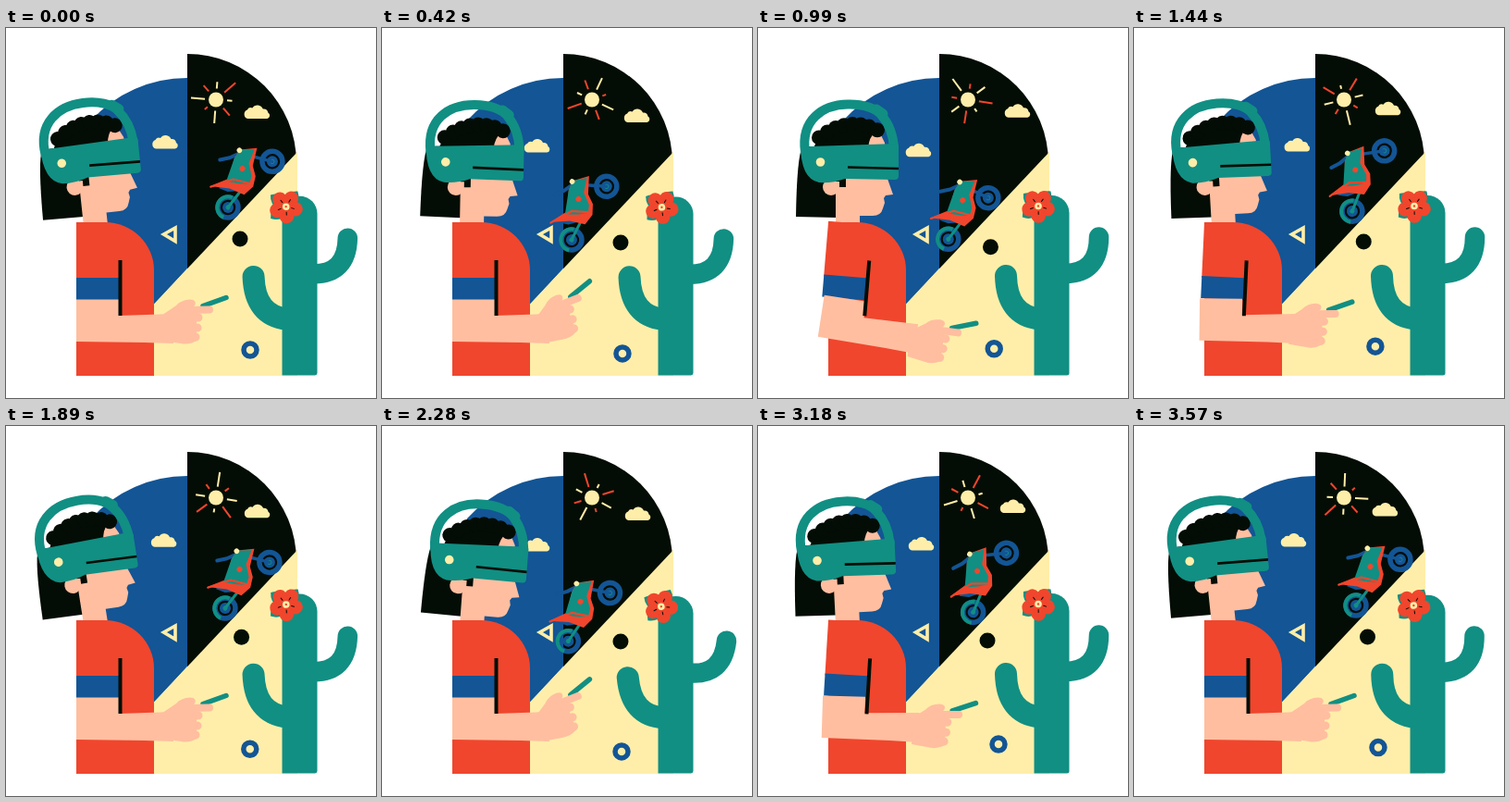
Animation of 400x400 px, one loop 3.6 s. Source, as an HTML page:

```html
<!DOCTYPE html>
<html lang="en">
<head>
<meta charset="utf-8">
<title>Virtual desert ride</title>
<style>
  html, body { margin: 0; width: 100%; height: 100%; overflow: hidden; background: #fff; }
  svg { display: block; width: 100vw; height: 100vh; }
  .black { fill: #040d05; } .blue { fill: #135595; } .cream { fill: #ffeea9; }
  .red { fill: #f0462d; } .teal { fill: #118f83; } .skin { fill: #ffbea0; }
  .line { fill: none; stroke-linecap: round; stroke-linejoin: round; }
  .flat { stroke-linecap: butt; stroke-linejoin: miter; }
  .s-teal { stroke: #118f83; } .s-blue { stroke: #135595; } .s-red { stroke: #f0462d; }
  .s-black { stroke: #040d05; } .s-cream { stroke: #ffeea9; } .s-skin { stroke: #ffbea0; }
</style>
</head>
<body>
<svg viewBox="0 0 400 400">
  <defs>
    <path id="cloud" class="cream" d="M-10 7a5 5 0 0 1-.5-9.500a4.500 4.500 0 0 1 5.500-2a6.500 6.500 0 0 1 11.500 1a5 5 0 0 1 5.500 4a3.500 3.500 0 0 1-1 6.500Z"/>
    <g id="wheel">
      <circle class="line s-blue" r="11" stroke-width="5.500"/>
      <circle class="blue" r="6"/>
      <circle class="teal" r="2.500"/>
    </g>
  </defs>

  <!-- scenery -->
  <path class="blue" d="M196 54A140 140 0 0 0 92 100V300H159L196 260Z"/>
  <path class="black" d="M196 28A118 118 0 0 1 314 146L196 262Z"/>
  <path class="cream" d="M315 134V376H150V309Z"/>
  <g id="sun"></g>
  <circle class="cream" cx="227" cy="77.500" r="8"/>
  <use id="cloudL" href="#cloud"/>
  <use id="cloudR" href="#cloud"/>
  <path class="line flat s-cream" stroke-width="3.600" d="M170.500 223L183 216V230.500Z"/>
  <circle id="dot" class="black" r="8.500"/>
  <circle id="ring" class="line s-blue" r="7" stroke-width="5.500"/>

  <!-- motorbike: rear axle at 0,0, heading right -->
  <g id="bike">
    <use href="#wheel"/>
    <path class="line flat s-teal" stroke-width="4" d="M-11 4A11.500 11.500 0 0 1 11-4"/>
    <use id="front" href="#wheel"/>
    <path class="line s-teal" stroke-width="3" d="M0 0L26-3"/>
    <path class="blue" d="M8-22L24-18L22-3L12-12Z"/>
    <path id="fork" class="line s-blue" stroke-width="3.500"/>
    <path class="line s-blue" stroke-width="4" d="M31-42L40-36L50-32"/>
    <path class="red" d="M3-30L23-21L43-32L54-34L68-22L51-12L45-2L35 4L22 3L16-13Z"/>
    <path class="teal" d="M19-21L43-32L54-34L65-23L50-17L42-5L34-1L27-9Z"/>
    <path class="line s-red" stroke-width="2.200" d="M3-29L26-17L36 1"/>
    <circle class="red" cx="41" cy="-18" r="3"/>
    <circle class="cream" cx="53" cy="-34" r="2.800"/>
  </g>

  <!-- cactus -->
  <g id="cactus">
    <path id="armR" class="line s-teal" stroke-width="21.500" d="M332 265.500Q368.500 265 368.500 226"/>
    <path id="armL" class="line s-teal" stroke-width="24" d="M268 268Q269 310.500 304 314.500"/>
    <path class="teal" d="M298.500 375.500V200A19 19 0 0 1 336.500 200V373Q336.500 375.500 334 375.500Z"/>
    <g id="flower"></g>
  </g>

  <!-- rider -->
  <g id="head">
    <path class="black" d="M48 128Q42 140 41 204L85 205V128Z"/>
    <path class="skin" d="M84 160V222H110V203H124Q133 203 135 195L137 189L136 184L138 181L146 180L140 163L137 124L131 112L118 108Z"/>
    <circle class="skin" cx="79" cy="172" r="9"/>
    <g id="curls" class="black"><path d="M60 130L66 116L104 102L127 112Q120 118 119 130Z"/></g>
    <path class="black" d="M84 158H95V172H88V166H84Z"/>
    <path class="line s-teal" stroke-width="10" d="M51 134C46 99 70 83 97 82.500C114 82 128 87 134 95C142 104 146 114 147 130"/>
    <path class="line s-teal" stroke-width="11" d="M128 88L135 93"/>
    <path class="teal" d="M46 126Q49 130 57 128L150 125Q152 125 152 128V160Q152 164 148 164L94 163Q80 168 66 167Q46 163 46 126Z"/>
    <path class="line flat s-black" stroke-width="2.700" d="M97 150.500L152 152"/>
    <circle class="cream" cx="67.500" cy="145" r="4.800"/>
  </g>
  <path class="red" d="M76 376V210H107A53 52 0 0 1 160 262V376Z"/>
  <g id="arm">
    <path class="red" d="M76 212H121V272H76Z"/>
    <path class="blue" d="M76 270H122V294H76Z"/>
    <g id="fore">
      <path class="skin" d="M76 293.500H122V311L181 309V341L150 340L76 339Z"/>
      <g id="hand">
        <path class="line s-teal" stroke-width="5.500" d="M213 300.500L238 291.500"/>
        <path class="skin" d="M170 309.500L184 300Q189 294 199 293.500Q207 294 204 300L198 305L206 309V338Q198 343 189 341L170 338Z"/>
        <path class="line s-skin" stroke-width="9" d="M204 313H208M203 324H207M200 334H205"/>
        <path class="line s-skin" stroke-width="8" d="M198 305L220 304.500"/>
      </g>
    </g>
    <path class="line flat s-black" stroke-width="4" d="M123.500 251V311"/>
  </g>
</svg>
<script>
const LOOP = 3600, RIDE = 1800, BEAT = 300, TAU = Math.PI * 2;
const $ = id => document.getElementById(id);
const add = (parent, tag, attrs) => {
  const el = document.createElementNS('http://www.w3.org/2000/svg', tag);
  for (const k in attrs) el.setAttribute(k, attrs[k]);
  return parent.appendChild(el);
};
const set = (id, value) => $(id).setAttribute('transform', value);
const move = (id, x, y) => set(id, `translate(${x} ${y})`);
const turn = (id, a, x, y) => set(id, `rotate(${a} ${x} ${y})`);
const petals = (tag, attrs) => {
  for (let a = -55; a < 300; a += 72) add($('flower'), tag, { ...attrs, transform: `rotate(${a})` });
};

const clamp = v => Math.max(0, Math.min(1, v));
const ease = v => { const u = clamp(v); return u * u * (3 - 2 * u); };
// Rounded bump of height 1 around mid, zero beyond reach.
const bump = (t, mid, reach) =>
  Math.cos(Math.min(1, Math.abs(t - mid) / reach) * Math.PI / 2) ** 2;

const rays = Array.from({ length: 8 }, (_, i) => add($('sun'), 'line', {
  class: i % 2 ? 's-cream' : 's-red', 'stroke-width': 2, x1: 12, transform: `rotate(${i * 45})`
}));

for (let x = 66; x < 132; x += 9)
  add($('curls'), 'circle', { cx: x, cy: 104 + (x - 104) ** 2 * 0.01, r: 8 });

for (const a of [-140, -50, 20, 145])
  add($('flower'), 'path', { class: 'teal', d: 'M5-7Q15-9 21 0Q15 9 5 7Z', transform: `rotate(${a})` });
petals('circle', { class: 'red', cx: 10.5, r: 7.8 });
add($('flower'), 'circle', { class: 'red', r: 9 });
petals('path', { class: 'line s-black', 'stroke-width': 1, d: 'M6 0H9' });
add($('flower'), 'circle', { class: 'cream', r: 3.8 });
add($('flower'), 'circle', { class: 'red', r: 1.2 });

function drawSky(t, p) {
  const a = p / RIDE * TAU, s = Math.sin(a), c = Math.cos(a);
  move('cloudL', 172 - 4.5 * s, 128 - 4.5 * c);
  move('cloudR', 276 - 4.7 * c, 91 + 4 * s);
  move('dot', 253 + 5 * s, 232.5 - 4.5 * c);
  move('ring', 259.5 + 4.5 * c, 348 + 4 * s);
  set('sun', `translate(227 77.5) rotate(${t / LOOP * 180 - 41})`);
  rays.forEach((ray, i) =>
    ray.setAttribute('x2', 22 + 6 * Math.cos(t / LOOP * TAU * 4 + i * 2.4)));
}

function drawBike(p, down) {
  const x = 240 - 40 * down;
  const hop = bump(p, 1440, 330);
  const tilt = -46 - 13 * bump(p, 380, 150) - 16 * hop;
  const base = 69 - 7 * bump(p, 990, 450) + 5 * hop;
  set('bike', `translate(${x} ${434 - x}) rotate(${tilt})`);
  move('front', base, 0);
  $('fork').setAttribute('d', `M52-30L${base} 0`);
}

// The cactus shakes beat by beat, then rests.
function drawCactus(p) {
  const b = p % BEAT;
  const shake = p > 1200 ? clamp((p - 1450) / 80) : clamp((920 - p) / 80);
  const squash = shake * 3 * Math.cos((b - 200) / BEAT * Math.PI) ** 2;
  const sway = shake * (1.2 + 5 * bump(b, 185, 70) - 2 * bump(b, 265, 40));
  set('cactus', `translate(0 376) scale(1 ${1 - squash / 195}) translate(0 -376)`);
  turn('armR', sway, 334, 265);
  turn('armL', -0.6 * sway, 304, 304);
  set('flower', `translate(${303 - squash * 0.4} 192.5) rotate(${-squash * 4})`);
}

function drawRider(p, down) {
  const nod = 1 - 7 * (1 - down) + 4 * bump(p, 510, 130) + 2 * bump(p, 1440, 330)
    - 4 * bump(p, 120, 120) - 9 * bump(p, 720, 140);
  const lift = 5.4 * bump(p, 1130, 620);
  turn('head', nod, 76, 215);
  turn('arm', lift, 116, 212);
  turn('fore', 4 * bump(p, 980, 300) - 2 * bump(p, 1440, 300), 95, 325);
  set('hand', `translate(${lift} ${lift * 1.5}) rotate(${-20 * bump(p, 450, 350)} 180 322)`);
}

function frame() {
  const t = performance.now() % LOOP, p = t % RIDE;
  const down = ease(p / 540) - ease((p - 800) / 800);
  drawSky(t, p);
  drawBike(p, down);
  drawCactus(p);
  drawRider(p, down);
  requestAnimationFrame(frame);
}
frame();
</script>
</body>
</html>
```
